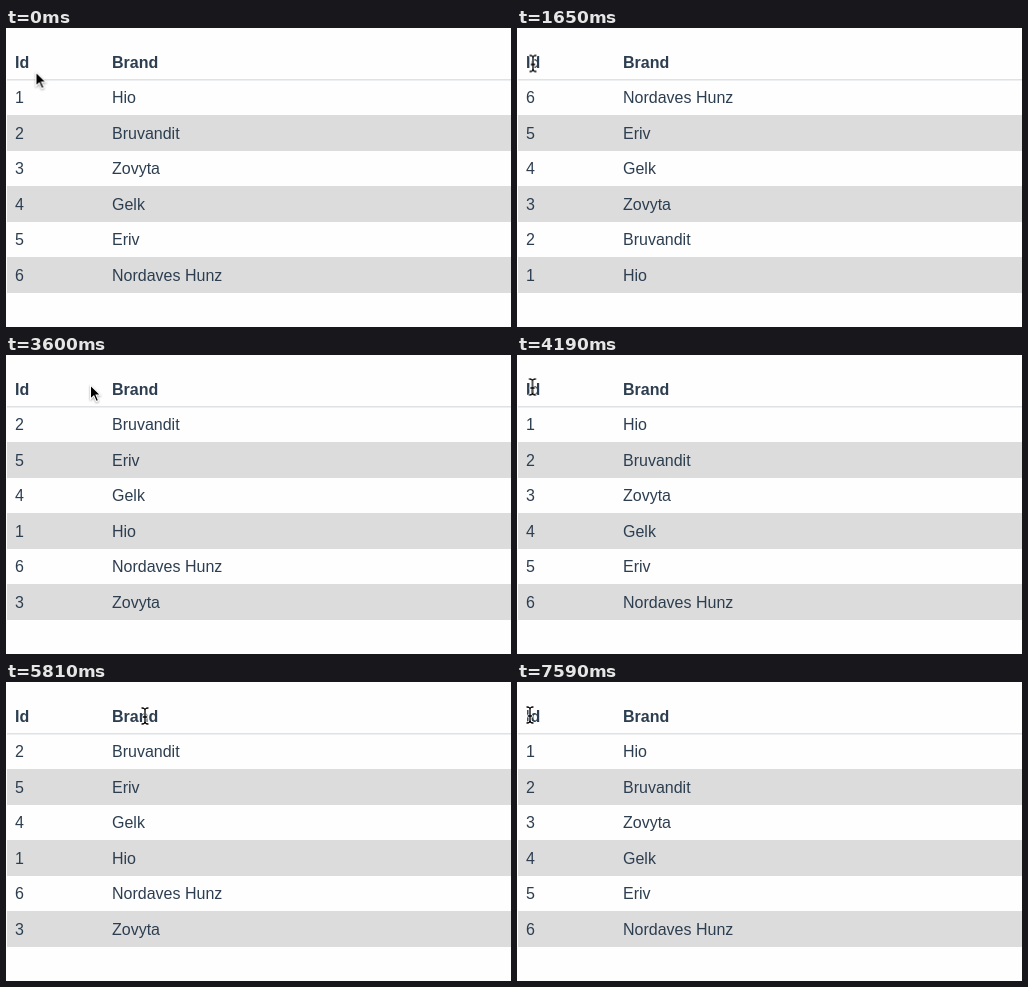
Recreate the animation shown at these times as an HTML page. Size 505 by 299 pixels, loop 8 s.

```html
<!DOCTYPE html>
<html lang="en">
<head>
<meta charset="utf-8">
<title>Sortable table</title>
<style>
html, body { margin: 0; width: 100%; height: 100%; overflow: hidden; background: #fefefe; }
svg { display: block; width: 505px; height: 299px; }
text { font: 16px "Liberation Sans", Arial, sans-serif; fill: #2c3e50; }
.head text { font-weight: bold; }
.bands { fill: #dcdcdc; }

/* --id and --name are a row's rank in each ascending order */
.row { animation: sort 8s -5ms step-end infinite; }
@keyframes sort {
  0%, 52.375%, 94.875%, 100% { transform: translateY(calc(var(--id) * 35.5px)); }
  20.625%, 59.75% { transform: translateY(calc((5 - var(--id)) * 35.5px)); }
  35.625%, 72.625% { transform: translateY(calc(var(--name) * 35.5px)); }
  80% { transform: translateY(calc((5 - var(--name)) * 35.5px)); }
}

.cursor { --beam: 0; animation: move 8s -5ms step-end infinite; }
.arrow { opacity: calc(1 - var(--beam)); filter: drop-shadow(0 1px 1px rgba(0, 0, 0, .35)); }
.beam { opacity: var(--beam); fill: none; stroke-linecap: round; }
@keyframes move {
  0% { --beam: 0; transform: translate(29.5px, 43px); }
  1.875% { --beam: 0; transform: translate(28px, 42px); }
  3.75% { --beam: 1; transform: translate(22px, 38px); }
  5.625% { --beam: 1; transform: translate(20px, 36.5px); }
  16.875% { --beam: 1; transform: translate(16.5px, 36px); }
  18.75% { --beam: 1; transform: translate(16px, 35.5px); }
  28.125% { --beam: 0; transform: translate(32px, 28px); }
  30% { --beam: 0; transform: translate(76px, 24px); }
  31.875% { --beam: 1; transform: translate(124px, 32px); }
  33.75% { --beam: 1; transform: translate(140.5px, 35px); }
  43.125% { --beam: 1; transform: translate(130px, 35px); }
  45% { --beam: 0; transform: translate(84px, 29px); }
  46.75% { --beam: 0; transform: translate(36px, 27px); }
  48.625% { --beam: 1; transform: translate(15.5px, 32px); }
  63.5% { --beam: 0; transform: translate(38px, 24px); }
  65.375% { --beam: 1; transform: translate(116px, 32px); }
  67.125% { --beam: 0; transform: translate(169.5px, 37.5px); }
  68.875% { --beam: 0; transform: translate(160px, 37px); }
  70.75% { --beam: 1; transform: translate(145px, 35px); }
  72.625% { --beam: 1; transform: translate(139px, 34px); }
  89.375% { --beam: 0; transform: translate(68.5px, 31px); }
  91.25% { --beam: 0; transform: translate(38px, 24px); }
  93% { --beam: 1; transform: translate(18px, 31px); }
  94.875%, 100% { --beam: 1; transform: translate(13px, 33px); }
}
</style>
</head>
<body>
<svg viewBox="0 0 505 299">
  <defs>
    <path id="ibeam" d="M-3 -8Q0 -8 0 -5.5V5.5Q0 8 -3 8M3 -8Q0 -8 0 -5.5V5.5Q0 8 3 8M-1.8 1H1.8"/>
  </defs>
  <g class="bands">
    <rect x="1" y="87" width="504" height="36"/>
    <rect x="1" y="158" width="504" height="36"/>
    <rect x="1" y="229" width="504" height="36"/>
  </g>
  <rect x="1" y="51" width="504" height="1.5" fill="#dfe2e5"/>
  <g class="head"><text x="9" y="40">Id</text><text x="106" y="40">Brand</text></g>

  <g class="row" style="--id:0;--name:3"><text x="9" y="75.1">1</text><text x="106" y="75.1">Hio</text></g>
  <g class="row" style="--id:1;--name:0"><text x="9" y="75.1">2</text><text x="106" y="75.1">Bruvandit</text></g>
  <g class="row" style="--id:2;--name:5"><text x="9" y="75.1">3</text><text x="106" y="75.1">Zovyta</text></g>
  <g class="row" style="--id:3;--name:2"><text x="9" y="75.1">4</text><text x="106" y="75.1">Gelk</text></g>
  <g class="row" style="--id:4;--name:1"><text x="9" y="75.1">5</text><text x="106" y="75.1">Eriv</text></g>
  <g class="row" style="--id:5;--name:4"><text x="9" y="75.1">6</text><text x="106" y="75.1">Nordaves Hunz</text></g>

  <g class="cursor">
    <g class="arrow">
      <path d="M0 0V16.2L3.7 12.7L6 18.2L9 17L6.8 11.6H11.6Z" fill="#fff"/>
      <path d="M1 2.4V13.8L4 10.9L6.5 16.8L7.8 16.3L5.3 10.6H9.2Z"/>
    </g>
    <g class="beam">
      <use href="#ibeam" stroke="#fff" stroke-width="3"/>
      <use href="#ibeam" stroke="#000" stroke-width="1.3"/>
    </g>
  </g>
</svg>
</body>
</html>
```
